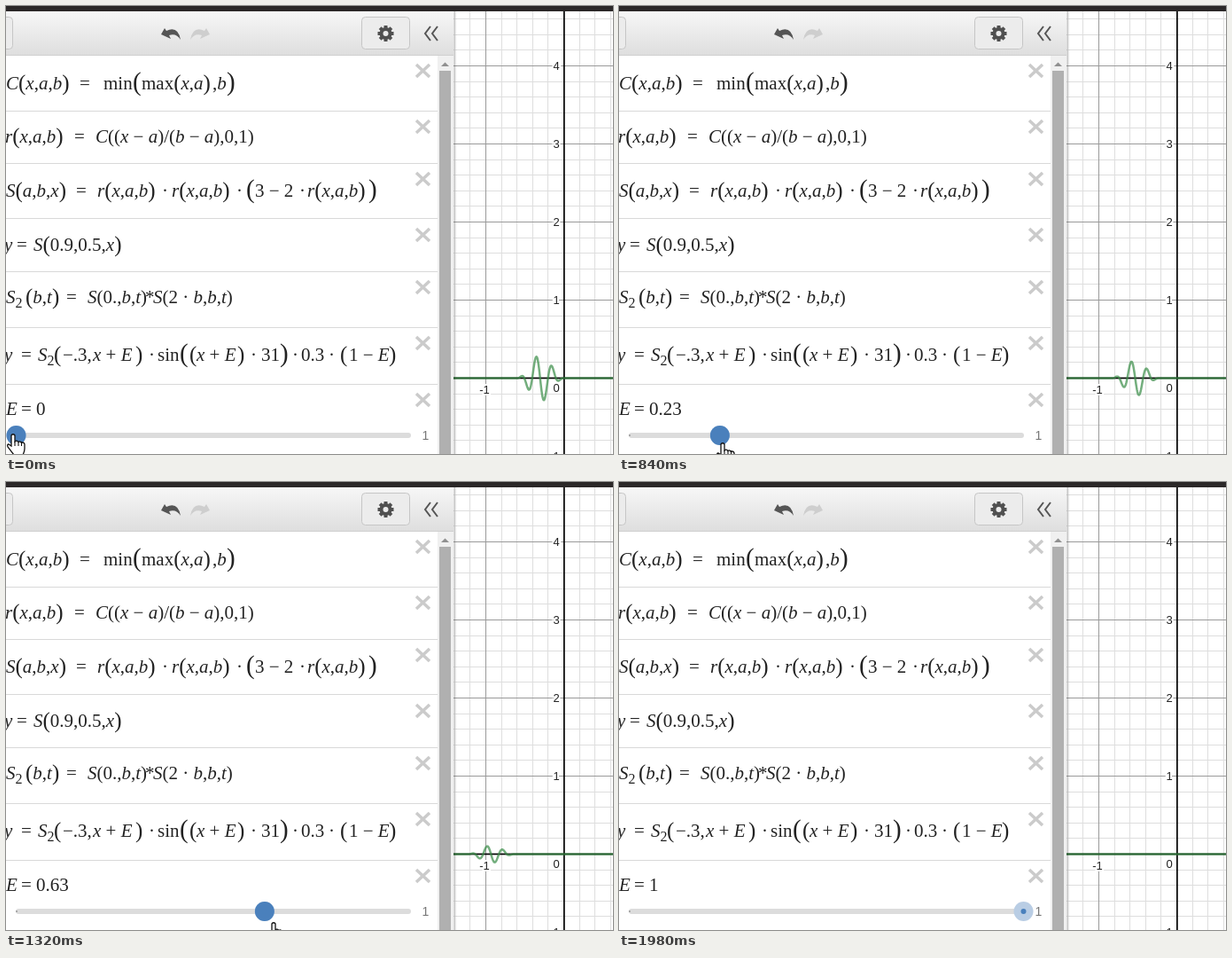
Write an HTML page with a canvas that moves like this. It is 685 px wide and 505 px high and loops after 2.34 s.

```html
<!DOCTYPE html>
<html lang="en">
<head>
<meta charset="utf-8">
<title>Wave packet slider</title>
<style>
html, body { margin: 0; width: 100%; height: 100%; overflow: hidden; background: #fff; }
canvas { display: block; width: 685px; height: 505px; }
</style>
</head>
<body>
<canvas id="stage" width="685" height="505"></canvas>
<script>
const g = document.getElementById('stage').getContext('2d');
const LOOP = 2340, STEP = 60, UNIT = 88, OX = 629.5, OY = 419.5;

// time, slider value, pointer x, pointer y
const KEYS = [
  [540, .01, 30, 487], [840, .23, 117, 493], [1080, .38, 190, 494],
  [1320, .63, 302, 497], [1560, .95, 447, 508], [1620, 1, 470, 520]
];

// Chunks: baseline, then [x, text] pairs. [ ] and { } are taller parentheses, _ lowers a digit.
const ROWS = [
  [94, [0, 'C[x,a,b]'], [83, '='], [110, 'min'], [143, '{'], [153, 'max[x,a]'], [233, ',b'], [249, '}']],
  [154, [-1, 'r[x,a,b]'], [77, '='], [101, 'C((x − a)/(b − a),0,1)']],
  [215, [0, 'S[a,b,x]'], [79, '='], [103, 'r[x,a,b]'], [176, '·'], [187, 'r[x,a,b]'], [260, '·'],
    [271, '{'], [281, '3 − 2'], [331, '·'], [340, 'r[x,a,b]'], [409, '}']],
  [276, [-2, 'y'], [12, '='], [31, 'S[0.9,0.5,x]']],
  [335, [0, 'S_2'], [22, '[b,t]'], [68, '='], [92, 'S(0.,b,t)'], [157, '*'], [166, 'S(2 · b,b,t)']],
  [400, [-2, 'y'], [17, '='], [36, 'S_2'], [54, '['], [64, '−.3,'], [98, 'x + E'], [146, ']'], [161, '·'],
    [171, 'sin'], [196, '{'], [207, '['], [215, 'x + E'], [261, ']'], [276, '·'], [288, '31'],
    [309, '}'], [323, '·'], [333, '0.3'], [364, '·'], [377, '['], [387, '1 − E'], [432, ']']]
];

const clamp = (v, a, b) => Math.min(Math.max(v, a), b);

function smooth(a, b, x) {
  const r = clamp((x - a) / (b - a), 0, 1);
  return r * r * (3 - 2 * r);
}

function wave(x, E) {
  const t = x + E, b = -.3;
  return smooth(0, b, t) * smooth(2 * b, b, t) * Math.sin(t * 31) * .3 * (1 - E);
}

function pose(time) {
  if (time < 540) return [0, 8, 483];
  const i = KEYS.findIndex(k => k[0] > time);
  if (i < 0) return KEYS[KEYS.length - 1].slice(1);
  const a = KEYS[i - 1], b = KEYS[i], u = (time - a[0]) / (b[0] - a[0]);
  return [1, 2, 3].map(n => a[n] + (b[n] - a[n]) * u);
}

function rect(x, y, w, h, color) {
  g.fillStyle = color;
  g.fillRect(x, y, w, h);
}

function line(points, color, width) {
  g.beginPath();
  points.forEach(([x, y]) => g.lineTo(x, y));
  g.strokeStyle = color;
  g.lineWidth = width;
  g.stroke();
}

function dot(x, y, r, color) {
  g.beginPath();
  g.arc(x, y, r, 0, 7);
  g.fillStyle = color;
  g.fill();
}

function math(x, y, text) {
  g.fillStyle = '#222';
  g.textAlign = 'left';
  g.textBaseline = 'alphabetic';
  for (const part of text.match(/min|max|sin|_\d|./g)) {
    let size = 21, drop = 0, s = part;
    if ('[]{}'.includes(s)) {
      size = '[]'.includes(s) ? 25 : 29;
      drop = size / 25;
      s = '[{'.includes(s) ? '(' : ')';
    } else if (s[0] === '_') {
      size = 16;
      drop = 5;
      s = s[1];
    }
    const style = /^[a-z]$/i.test(s) ? 'italic ' : '';
    g.font = `${style}${size}px "Liberation Serif", serif`;
    g.fillText(s, x, y + drop);
    x += g.measureText(s).width;
  }
}

function label(text, x, y) {
  g.font = '13px "Liberation Sans", sans-serif';
  g.textAlign = 'center';
  g.textBaseline = 'middle';
  g.strokeStyle = '#fff';
  g.lineWidth = 4;
  g.strokeText(text, x, y);
  g.fillStyle = '#222';
  g.fillText(text, x, y);
}

function graph(E) {
  g.save();
  g.beginPath();
  g.rect(505, 6, 180, 499);
  g.clip();
  for (const major of [false, true]) {
    const color = major ? '#9a9a9a' : '#dedede';
    for (let i = -7; i <= 24; i++) {
      if ((i % 5 === 0) !== major) continue;
      const shift = i * UNIT / 5;
      rect(Math.floor(OX + shift), 6, 1, 499, color);
      rect(505, Math.floor(OY - shift), 180, 1, color);
    }
  }
  rect(629, 6, 1.7, 499, '#000');
  rect(505, 418.6, 180, 1.7, '#000');
  for (const n of [-1, 1, 2, 3, 4]) label(n, n < 0 ? 619 : 621, OY - n * UNIT + 1);
  label('-1', 540, 433);
  label('0', 621, 431);
  const points = [];
  for (let x = 503; x <= 687; x += .5) points.push([x, OY - wave((x - OX) / UNIT, E) * UNIT]);
  g.lineJoin = 'round';
  line(points, 'rgba(56,140,70,.7)', 2.5);
  g.restore();
  const shade = g.createLinearGradient(504, 0, 509, 0);
  shade.addColorStop(0, 'rgba(0,0,0,.2)');
  shade.addColorStop(1, 'rgba(0,0,0,0)');
  rect(504, 6, 5, 499, shade);
}

function button(x, w) {
  g.beginPath();
  g.roundRect(x + .5, 12.5, w, 36, 4);
  g.fillStyle = '#ececec';
  g.fill();
  g.strokeStyle = '#c6c6c6';
  g.lineWidth = 1;
  g.stroke();
}

function turnArrow(x, dir, color) {
  g.save();
  g.translate(x, 0);
  g.scale(dir, 1);
  g.fillStyle = color;
  g.fill(new Path2D('M0 32L4 25L6 28Q19 22 22 38Q17 30 9 33L11 37Z'));
  g.restore();
}

function header() {
  const fill = g.createLinearGradient(0, 6, 0, 56);
  fill.addColorStop(0, '#f7f7f7');
  fill.addColorStop(1, '#dedede');
  rect(0, 6, 505, 50, fill);
  rect(0, 55, 505, 1, '#cfcfcf');
  button(-20, 27);
  button(401, 54);
  turnArrow(175, 1, '#555');
  turnArrow(230, -1, '#cecece');
  for (let i = 0; i < 4; i++) {
    const a = i * Math.PI / 4, c = 9 * Math.cos(a), s = 9 * Math.sin(a);
    line([[428.5 - c, 31 - s], [428.5 + c, 31 + s]], '#505050', 4);
  }
  dot(428.5, 31, 7, '#505050');
  dot(428.5, 31, 3, '#ececec');
  for (const x of [473, 481]) line([[x + 6, 23], [x, 31], [x + 6, 39]], '#555', 2);
}

function panel() {
  rect(0, 56, 488, 449, '#fff');
  for (const y of [118, 177, 239, 299, 362, 426]) rect(0, y, 487, 1, '#d9d9d9');
  for (const y of [73, 136, 195, 258, 317, 380, 444]) {
    line([[463, y - 7], [478, y + 7]], '#cbcbcb', 3.5);
    line([[463, y + 7], [478, y - 7]], '#cbcbcb', 3.5);
  }
  for (const [y, ...chunks] of ROWS) for (const [x, text] of chunks) math(x, y, text);
  rect(487, 56, 18, 449, '#f0f0f0');
  rect(489, 73, 13, 432, '#b0b0b0');
  g.fillStyle = '#909090';
  g.fill(new Path2D('M491 68L495.5 63.5L500 68Z'));
}

function slider(E, glow) {
  math(0, 461, 'E');
  math(17, 461, '=');
  math(34, 461, E === 0 || E === 1 ? String(E) : E.toFixed(2));
  g.beginPath();
  g.roundRect(11, 481, 446, 6, 3);
  g.fillStyle = '#dcdcdc';
  g.fill();
  dot(12, 484, 1, '#999');
  g.font = '14px "Liberation Sans", sans-serif';
  g.textAlign = 'center';
  g.textBaseline = 'middle';
  g.fillStyle = '#777';
  g.fillText('1', 473.5, 485);
  const x = 11.5 + E * 445;
  dot(x, 484, 11, '#b9cde4');
  g.globalAlpha = glow;
  dot(x, 484, 11, '#4a80bc');
  g.globalAlpha = 1;
  dot(x, 484, 3, '#4a80bc');
}

function hand(x, y) {
  const shape = new Path2D('M-2 1Q0 -1.500 2 1V8Q4 6 6 8.500Q8 7 9.500 9.500Q12 8 13 11V16Q13 19 11 23H1L-6 14Q-7 11 -5 11L-2 13Z');
  g.save();
  g.translate(x, y);
  g.fillStyle = '#fff';
  g.fill(shape);
  g.strokeStyle = '#111';
  g.lineWidth = 1.3;
  g.stroke(shape);
  for (const a of [2, 6, 9.5]) line([[a, 8], [a, 13]], '#111', 1.1);
  g.restore();
}

function draw(now) {
  const time = Math.floor(now % LOOP / STEP) * STEP;
  const [value, x, y] = pose(time), E = Math.round(value * 100) / 100;
  rect(0, 0, 685, 505, '#fff');
  graph(E);
  header();
  panel();
  slider(E, clamp((1980 - time) / 300, 0, 1));
  rect(0, 0, 685, 6, '#2b2828');
  hand(x, y);
}

const start = performance.now();
function tick() {
  draw(performance.now() - start);
  requestAnimationFrame(tick);
}
tick();
</script>
</body>
</html>
```
